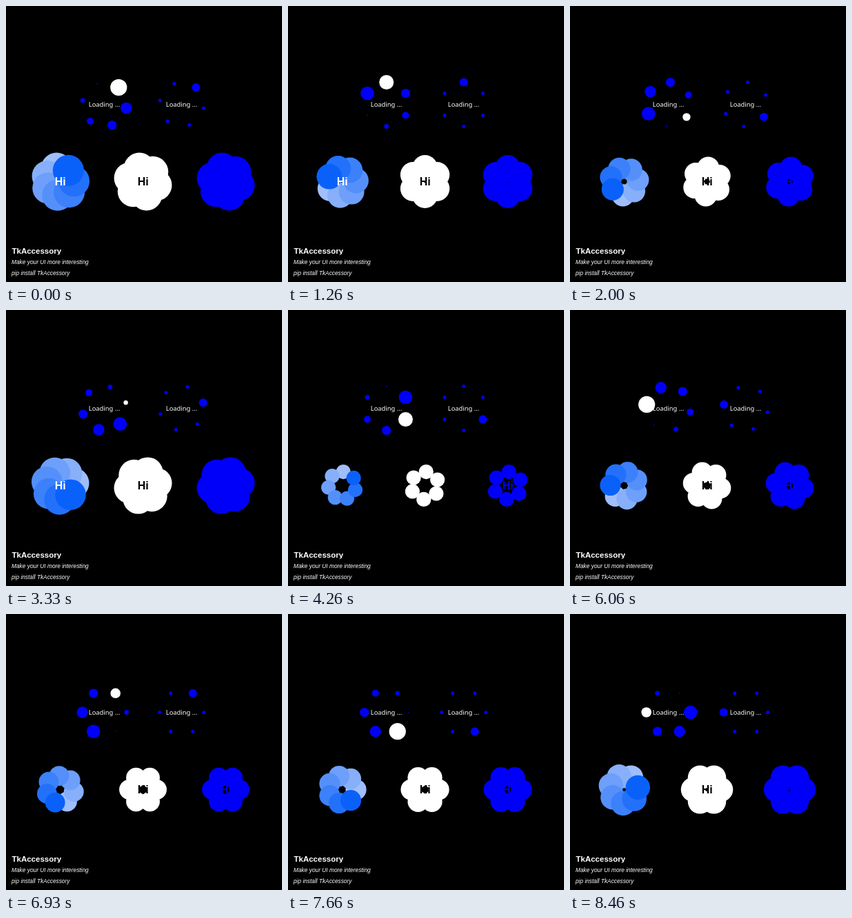
Animation of 400 by 400 pixels, one loop 8530 ms. Source, as an HTML page with a canvas:

```html
<!DOCTYPE html>
<html lang="en">
<head>
<meta charset="utf-8">
<title>TkAccessory</title>
<style>
  html, body { margin: 0; width: 100%; height: 100%; overflow: hidden; background: #000; }
  canvas { display: block; }
</style>
</head>
<body>
<canvas id="stage" width="400" height="400"></canvas>
<script>
const ctx = document.getElementById('stage').getContext('2d');
const LOOP = 8530, FRAMES = 128;
const BLUE = '#0000fa', WHITE = '#ffffff';
const SANS = '"Liberation Sans", Arial, sans-serif';

function dot(x, y, r, color) {
  ctx.fillStyle = color;
  ctx.beginPath();
  ctx.arc(x, y, r, 0, 2 * Math.PI);
  ctx.fill();
}

// Dot on an orbit; degrees run counterclockwise from the right.
function orbitDot(cx, cy, orbit, deg, r, color) {
  const a = deg * Math.PI / 180;
  dot(cx + orbit * Math.cos(a), cy - orbit * Math.sin(a), r, color);
}

function text(str, x, y, font, color, align = 'left') {
  ctx.font = font;
  ctx.fillStyle = color;
  ctx.textAlign = align;
  ctx.fillText(str, x, y);
}

function loader(cx, turn, active, radius) {
  for (let i = 0; i < 6; i++) {
    const on = i === active;
    orbitDot(cx, 142.5, 32, turn - 60 * i, radius(i, on), radius === fading && on ? WHITE : BLUE);
  }
  text('Loading ...', cx - 0.2, 146.3, '9.35px "Noto Sans", "Open Sans", sans-serif', WHITE, 'center');
}

const fading = (i, on) => (i === 5 ? 0.9 : 9.8 - 1.6 * i) + (on ? 2.3 : 0);
const plain = (i, on) => on ? 6 : 2.5;

function flower(cx, petals, turn, r, color, label) {
  for (let i = petals - 1; i >= 0; i--) {
    orbitDot(cx, 254.5, 20, turn - 360 / petals * i, r, color(i));
  }
  if (label) text('Hi', cx + 0.3, 260, `bold 16px ${SANS}`, label, 'center');
}

function shade(i) {
  const mix = (a, b) => Math.round(a + (b - a) * i / 6);
  return `rgb(${mix(10, 160)}, ${mix(97, 190)}, 250)`;
}

function captions() {
  ctx.save();
  ctx.beginPath();
  ctx.rect(0, 340, 400, 20.5);
  ctx.clip();
  text('TkAccessory', 8.5, 359, `bold 11.5px ${SANS}`, WHITE);
  ctx.restore();
  text('Make your UI more interesting', 8, 374, `italic 8.35px ${SANS}`, WHITE);
  text('pip install TkAccessory', 8, 390, `italic 8.3px ${SANS}`, WHITE);
}

function draw(t) {
  const frame = Math.ceil((Math.floor(t / 10) + 1) * FRAMES * 10 / LOOP) - 1;

  // Loaders and flowers run on separate timers, slightly faster than the pictures.
  const tick = Math.floor(frame * 1.062 + 0.11);
  const spin = 50 + 5 * tick;
  const step = Math.floor((tick + 1) / 4);
  const active = (6 - step % 6) % 6;

  const beat = Math.floor(frame * 1.0639 - 0.2);
  const turn = 50 + 5 * beat;
  const petal = 15.6 + 7 * Math.cos(2 * Math.PI * (beat - 24.8) / 26);

  ctx.fillStyle = '#000';
  ctx.fillRect(0, 0, 400, 400);

  loader(142.7, spin, active, fading);
  loader(254.7, spin, active, plain);

  flower(78.5, 7, turn + 60 - 360 / 7, petal, shade, petal > 18 && WHITE);
  flower(198.5, 6, turn, petal, () => WHITE, '#000');
  flower(318.5, 6, turn, petal, () => BLUE, BLUE);

  captions();
}

const start = performance.now();
function loop() {
  draw((performance.now() - start) % LOOP);
  requestAnimationFrame(loop);
}
loop();
</script>
</body>
</html>
```
